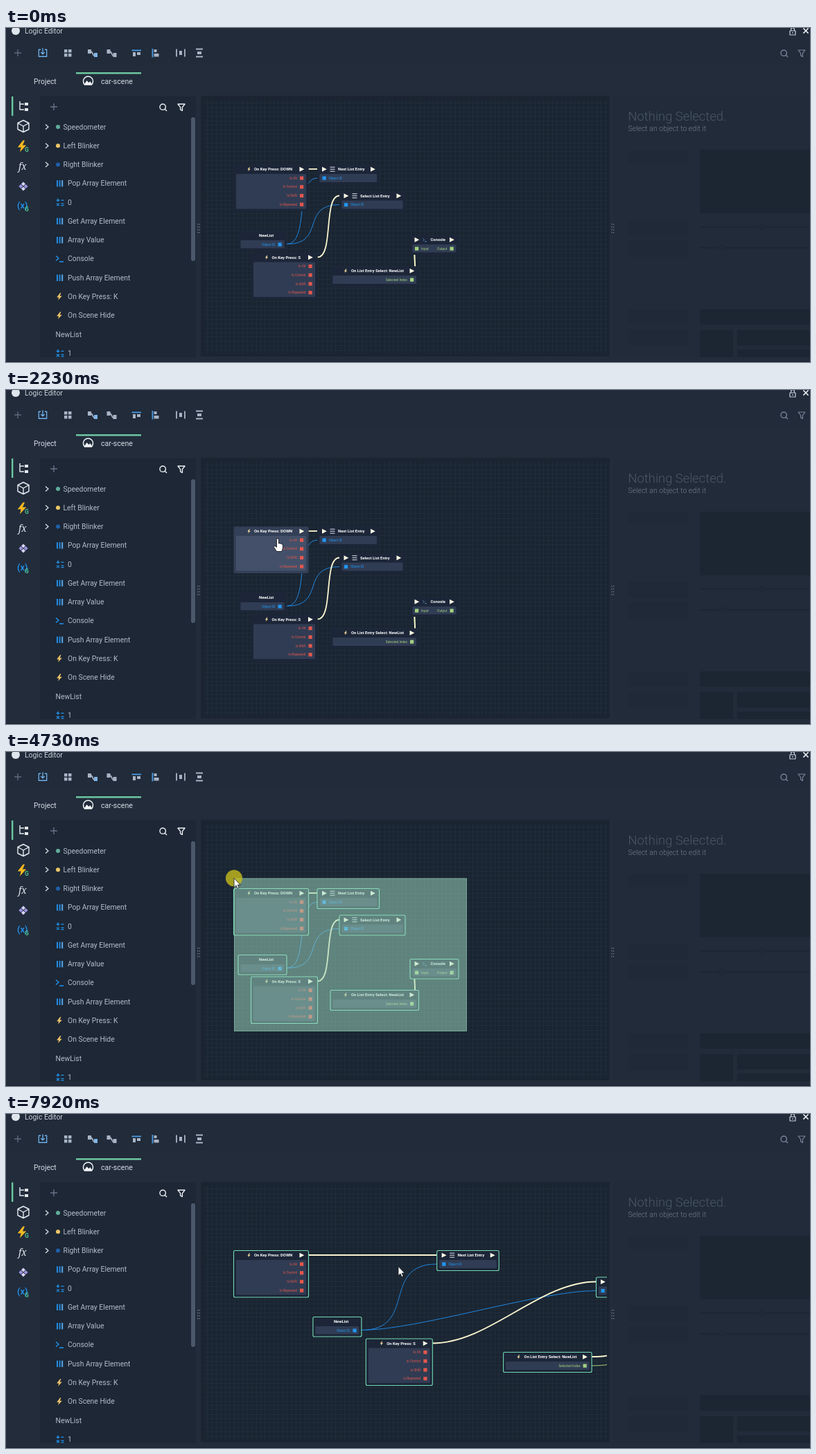
Write an HTML page with a canvas that moves like this. It is 1160 px wide and 483 px high and loops after 8000 ms.

```html
<!DOCTYPE html>
<html lang="en">
<head>
<meta charset="utf-8">
<title>Logic Editor</title>
<style>
  html, body { margin: 0; width: 100%; height: 100%; overflow: hidden; background: #222c3b; }
  #stage { position: relative; width: 1160px; height: 483px; overflow: hidden; }
  canvas { position: absolute; left: 0; top: 0; }
  .label { position: absolute; line-height: 16px; white-space: pre; font-family: Roboto, "Open Sans", sans-serif; }
</style>
</head>
<body>
<div id="stage"><canvas id="view" width="1160" height="483"></canvas></div>
<script>
const W = 1160, H = 483, LOOP = 8000, TICK = 77.55;
const stage = document.getElementById('stage');
const ctx = document.getElementById('view').getContext('2d');
const back = document.createElement('canvas');
back.width = W;
back.height = H;

const BLUE = '#2196f3', RED = '#e2574c', GREEN = '#a3d27f', CREAM = '#fbf6d0', MINT = '#74dcb4';
const BOLT = 'M1-5.5L-4 1h3.2L-2 5.5 4-1H.6L2.6-5.5z';
const FUNNEL = 'M-5-5H5L1.4-.4V4.6L-1.4 3V-.4z';

// ---------- drawing helpers ----------
function box(g, x, y, w, h, color, r = 0) {
  g.fillStyle = color;
  g.beginPath();
  g.roundRect(x, y, w, h, r);
  g.fill();
}

function dot(g, x, y, r, color) {
  g.fillStyle = color;
  g.beginPath();
  g.arc(x, y, r, 0, 7);
  g.fill();
}

function icon(g, x, y, d, { fill, line, w = 1.4, s = 1 }) {
  g.save();
  g.translate(x, y);
  g.scale(s, s);
  const p = new Path2D(d);
  if (fill) { g.fillStyle = fill; g.fill(p); }
  if (line) { g.strokeStyle = line; g.lineWidth = w; g.lineJoin = 'round'; g.stroke(p); }
  g.restore();
}

function label(text, x, y, size = 10.4, color = '#b3bdc9', css = '') {
  const el = document.createElement('div');
  el.className = 'label';
  el.textContent = text;
  el.style.cssText = `left:${x}px;top:${y - 8}px;font-size:${size}px;color:${color};${css}`;
  stage.append(el);
}

function write(text, x, y, size, color, weight = 400, align = 'left') {
  ctx.font = `${weight} ${size}px Roboto, sans-serif`;
  ctx.textAlign = align;
  ctx.fillStyle = color;
  ctx.fillText(text, x, y + size * 0.36);
}

// ---------- fixed interface ----------
function search(g, x, y, color) {
  icon(g, x, y, 'M3.4-.8A4.2 4.2 0 1 1-5-.8A4.2 4.2 0 1 1 3.4-.8M2.2 2.2L5 5', { line: color });
}

function drawToolbar(g) {
  const c = '#a9b5c6', dim = '#5d6a7c', tint = '#4a9be4';
  dot(g, 14, 4, 6, '#dfe5ec');
  icon(g, 1135, 5, 'M-4-1H4V5H-4zM-2.4-1V-3A2.4 2.4 0 0 1 2.4-3V-1M0 1V3', { line: '#c7cfd9', w: 1.2 });
  icon(g, 1154, 4, 'M-3.6-3.6L3.6 3.6M3.6-3.6L-3.6 3.6', { line: '#e8ecf1', w: 1.5 });
  icon(g, 17, 36, 'M-5 0H5M0-5V5', { line: dim });
  icon(g, 53, 36, 'M-3-5H-6V5.5H6V-5H3M0-7V2M-3-1L0 2 3-1', { line: '#6fb0ea', s: 0.95 });
  for (const [x, y] of [[84, 31], [90, 31], [84, 37], [90, 37]]) box(g, x, y, 4.5, 4.5, c);
  for (const x of [125, 152.5]) {
    box(g, x - 7, 31, 5, 6, c);
    box(g, x + 2, 36, 5, 6, x > 130 ? c : '#7fb4e6');
    icon(g, x, 36, 'M-3-2C0-3 0 5 3 4', { line: c, w: 1.8 });
  }
  box(g, 181.5, 31.5, 13.5, 1.8, tint);
  box(g, 183, 35, 4, 6, c);
  box(g, 189, 35, 5, 4, c);
  box(g, 210.5, 30, 1.8, 12.5, tint);
  box(g, 213.5, 31, 4, 4, c);
  box(g, 213.5, 37, 7, 4.5, c);
  icon(g, 252, 36, 'M-6-5.5V5.5M6-5.5V5.5', { line: c, w: 1.8 });
  box(g, 250, 33, 4, 6, c);
  icon(g, 279, 36, 'M-5-5.5H5M-5 5.5H5', { line: c, w: 1.8 });
  box(g, 276, 34, 6, 4, c);
  search(g, 1123, 37, '#76839a');
  icon(g, 1148, 37, FUNNEL, { line: '#76839a', w: 1.2 });
  box(g, 101, 64, 94, 2.4, '#6cc6a0');
  icon(g, 118.5, 77, 'M7 0A7 7 0 1 0-7 0 7 7 0 0 0-5 5H5A7 7 0 0 0 7 0z', { line: '#f1f4f7', w: 1.5 });
  icon(g, 118.5, 77, 'M-6 5L-2-1 1 2 3 0 6 5z', { fill: '#f1f4f7' });
  label('Logic Editor', 27, 5, 10.4, '#c9d1da');
  label('Project', 40, 77.5, 10.4, '#d6dce4');
  label('car-scene', 137, 77.5, 10.6, '#d6dce4');
}

function drawRail(g) {
  const c = '#e6ebf1';
  box(g, 8, 99, 2.4, 28, '#6cc6a0');
  icon(g, 25, 113, 'M-5-7V5H1M-5-3H1', { line: c });
  box(g, 27, 108, 5, 4, c);
  box(g, 27, 116, 5, 4, c);
  icon(g, 25, 142, 'M0-8.5L8-4.5V4.5L0 8.5-8 4.5V-4.5zM-8-4.5L0 0 8-4.5M0 0V8.5', { line: c });
  icon(g, 23, 171, BOLT, { fill: '#f5b921', s: 1.55 });
  for (const [dx, dy] of [[0, -3.6], [-3.6, 0], [3.6, 0], [0, 3.6]])
    icon(g, 25 + dx, 229 + dy, 'M0-3L3 0 0 3-3 0z', { fill: dy ? '#d6d4f4' : '#9c94e0' });
  label('G', 27, 175.5, 8.5, '#4fc08d', 'font-weight:700');
  label('fx', 18, 199.5, 13.5, c, 'font-style:italic;font-weight:500;font-family:"Noto Serif",serif');
  label('(x)', 16, 257, 13, BLUE, 'font-weight:500');
  label('G', 27, 262, 8.5, '#4fc08d', 'font-weight:700');
}

function drawTree(g) {
  box(g, 49, 99, 225, 377, '#1d2735');
  icon(g, 69, 114, 'M-5 0H5M0-5V5', { line: '#66738a' });
  search(g, 227, 115, '#eef1f5');
  icon(g, 253, 115, FUNNEL, { line: '#eef1f5' });
  box(g, 267, 129, 6, 208, '#4b586b', 3);
  const rows = ['>Speedometer', '>Left Blinker', '>Right Blinker', '|Pop Array Element', '=0', '|Get Array Element',
    '|Array Value', '_Console', '|Push Array Element', '!On Key Press: K', '!On Scene Hide', ' NewList', '=1'];
  const dots = ['#5fae9c', '#ecc765', '#1f5fa8'];
  rows.forEach((row, i) => {
    const y = 143 + i * 27.28, kind = row[0];
    if (kind === '>') {
      icon(g, 59, y, 'M-2-3.5L2 0-2 3.5', { line: '#d5dbe3' });
      dot(g, 75, y, 3, dots[i]);
    }
    if (kind === '|') for (let k = 0; k < 3; k++) box(g, 73 + k * 3.6, y - 4.7, 2, 9.4, k < 2 ? '#2389e0' : '#5aa7e8');
    if (kind === '_') icon(g, 77, y, 'M-5-4.5L-1-1-5 2.5M0 4H6', { line: BLUE });
    if (kind === '!') icon(g, 77, y, BOLT, { fill: '#f0c56a', s: 0.95 });
    if (kind === '=') icon(g, 78, y, 'M-5.5-3H-.5M-3-5.5V-.5M1.5-3H5.5M-5 1.5L-1 5M-1 1.5L-5 5M1.5 2H5.5M1.5 4.5H5.5', { line: BLUE, w: 1.3 });
    label(row.slice(1), kind === '>' ? 82.5 : kind === ' ' ? 71.5 : 89, y + 0.5);
  });
  box(g, 45, 476, 232, 7, '#222c3b');
}

function drawInspector(g) {
  const fade = '#1f2937', dark = '#1c2532';
  box(g, 876, 99, 284, 377, '#212b39');
  for (const [y, h] of [[177, 18], [277, 23], [307, 24], [407, 22], [437, 23]]) box(g, 898, y, 86, h, fade);
  for (const [x, y, w, h] of [[1001, 176, 159, 92], [1001, 407, 159, 22], [1001, 437, 48, 39], [1055, 437, 105, 22], [1055, 465, 105, 11]])
    box(g, x, y, w, h, dark);
  for (const [y, knob] of [[287, 1091], [317, 1032]]) {
    box(g, 1001, y, 159, 1.5, dark);
    dot(g, knob, y + 1, 5, '#1f2937');
  }
  label('Nothing Selected.', 897.5, 128, 18.4, '#4b5866', 'font-weight:300');
  label('Select an object to edit it', 897.5, 146, 10.5, '#727e8b', 'font-weight:300');
}

function drawBoard(g) {
  box(g, 281, 98, 590, 377, '#1b2532');
  box(g, 286, 104, 581, 367, '#1a2532');
  g.fillStyle = '#202c3a';
  for (let x = 290.4; x < 867; x += 6.38) g.fillRect(Math.round(x), 104, 1, 367);
  for (let y = 108.3; y < 471; y += 6.38) g.fillRect(286, Math.round(y), 581, 1);
  for (const x of [276, 873.5])
    for (let k = 0; k < 8; k++) box(g, x + (k & 1) * 2.5, 283 + (k >> 1) * 4, 1.2, 1.4, '#707d8e');
}

function drawBack() {
  const g = back.getContext('2d');
  box(g, 0, 0, W, H, '#222c3b');
  box(g, 0, 0, W, 53, '#212b39');
  drawToolbar(g);
  drawRail(g);
  drawTree(g);
  drawInspector(g);
  drawBoard(g);
  box(g, 0, 482, W, 1, '#19212c');
}

// ---------- node graph ----------
const keyRows = ['Is Alt', 'Is Control', 'Is Shift', 'Is Repeated'].map((text, i) => ({ text, i, out: true, color: RED }));
const idIn = [{ text: 'Object ID', i: 0, color: BLUE }];
const nodes = {
  down: { x: 328.5, y: 197.5, w: 108, h: 67.5, title: 'On Key Press: DOWN', tx: 29.5, mark: 'bolt', mx: 22, plays: [98], rows: keyRows },
  list: { x: 335, y: 293.5, w: 70, h: 28.5, title: 'NewList', tx: 30, plays: [], rows: [{ text: 'Object ID', i: 0, out: true, color: BLUE }] },
  key: { x: 353.5, y: 325, w: 96, h: 67.5, title: 'On Key Press: S', tx: 30, mark: 'bolt', mx: 22.5, plays: [85.5], rows: keyRows },
  next: { x: 449, y: 197.5, w: 89.5, h: 29, title: 'Next List Entry', tx: 30, mark: 'lines', mx: 22, plays: [10, 80], rows: idIn },
  pick: { x: 468, y: 344.5, w: 127.5, h: 29, title: 'On List Entry Select: NewList', tx: 30, mark: 'bolt', mx: 22, plays: [117.5], rows: [{ text: 'Selected Index', i: 0, out: true, color: GREEN }] },
  select: { x: 481, y: 236, w: 95, h: 29, title: 'Select List Entry', tx: 30, mark: 'lines', mx: 22, plays: [9.5, 85.5], rows: idIn },
  log: { x: 583, y: 299.5, w: 70, h: 28.5, title: 'Console', tx: 29.5, mark: 'prompt', mx: 21, plays: [9.5, 60], rows: [
    { text: 'Input', i: 0, color: GREEN }, { text: 'Output', i: 0, out: true, color: GREEN }] }
};
const all = Object.values(nodes);

// Equal gaps from the leftmost node onwards
let edge = all[0].x;
for (const n of all) {
  n.spread = edge;
  edge += n.w + 6.4;
}

const wires = [
  ['down', 'next', 6.5, 6.5, CREAM, 1.8], ['list', 'next', 19, 19.5, '#1f86e0', 1], ['list', 'select', 19, 19.5, '#1f86e0', 1],
  ['pick', 'log', 19.5, 19.5, GREEN, 1], ['key', 'select', 6.5, 6.5, CREAM, 1.8], ['pick', 'log', 6.5, 6.5, CREAM, 1.8]
];

function drawWire([from, to, dy0, dy1, color, width], left) {
  const a = nodes[from], b = nodes[to];
  const x0 = left(a) + a.w, y0 = a.y + dy0, x1 = left(b), y1 = b.y + dy1;
  ctx.strokeStyle = color;
  ctx.lineWidth = width;
  ctx.beginPath();
  if (x1 < x0) {
    ctx.moveTo(x0 - 5, y0);
    ctx.lineTo(x1 + 5.5, y1);
  } else {
    const d = Math.min(0.75 * (x1 - x0), 82);
    ctx.moveTo(x0, y0);
    ctx.bezierCurveTo(x0 + d, y0, x1 - d, y1, x1, y1);
  }
  ctx.stroke();
}

function drawNode(n, x, hover, chosen) {
  const { y, w, h } = n, ty = y + 6.7;
  box(ctx, x, y, w, h, hover ? '#333f56' : '#1c2638', 2);
  box(ctx, x + 3.5, y + 13.5, w - 7, h - 17, hover ? '#445069' : '#303c53', 1);
  if (n.mark === 'bolt') icon(ctx, x + n.mx, ty, BOLT, { fill: '#f3dc9a', s: 0.55 });
  if (n.mark === 'lines') icon(ctx, x + n.mx, ty, 'M-3.5-3H3.5M-3.5 0H3.5M-3.5 3H3.5', { line: '#dfe5ee', w: 1 });
  if (n.mark === 'prompt') icon(ctx, x + n.mx, ty, 'M-2.5-2L-.5 0-2.5 2M0 2.5H3', { line: '#5b9bd8', w: 0.8 });
  write(n.title, x + n.tx, ty, 5.85, '#fff', 700);
  for (const p of n.plays) icon(ctx, x + p, ty, 'M-3-3.5L3.8 0-3 3.5z', { fill: '#fffbe6' });
  for (const r of n.rows) {
    const px = r.out ? (n.plays.length ? n.plays[n.plays.length - 1] : 60) : n.plays[0];
    const ry = y + 19.5 + r.i * 12.7;
    box(ctx, x + px - 2.5, ry - 2.5, 5.2, 5.2, r.color);
    write(r.text, x + px + (r.out ? -6.5 : 6.5), ry, 4.8, r.color, 400, r.out ? 'right' : 'left');
  }
  if (chosen) {
    ctx.strokeStyle = MINT;
    ctx.lineWidth = 1.1;
    ctx.beginPath();
    ctx.roundRect(x, y, w, h, 2);
    ctx.stroke();
  }
}

// ---------- pointer ----------
const DRAG = 44, DROP = 60, PRESS = 85, RELEASE = 88;
const path = [
  [0, 868, 438], [1, 788, 406], [2, 711, 386], [6, 711, 386], [8, 688, 396], [10, 620, 285], [11, 598, 235], [13, 490, 172],
  [15, 370, 205], [17, 360, 280], [19, 397.5, 302], [21, 500, 357], [23, 608, 285], [24, 598, 235], [26, 480, 173],
  [27, 392, 215], [28, 456, 353], [29, 500, 338], [31, 581, 321], [33, 581, 321], [36, 600, 344], [39, 633, 379],
  [41, 665, 404], [44, 665, 404], [46, 612, 368], [48, 500, 300], [50, 408, 242], [54, 344, 206.5], [58, 329, 182.5],
  [67, 329, 182.5], [72, 300, 135], [77, 258, 64.5], [78, 257.5, 55.5], [82, 253.5, 38], [97, 253.5, 38], [100, 566, 220.5]
];

// Smooth curve through the points, at rest where the pointer holds still
function pointAt(n) {
  let i = 0;
  while (i < path.length - 2 && path[i + 1][0] <= n) i++;
  const a = path[i], b = path[i + 1], span = b[0] - a[0];
  const u = Math.min(1, (n - a[0]) / span);
  const slope = (k, c) => {
    const p = path[k - 1], q = path[k], r = path[k + 1];
    if (!p || !r || (q[c] - p[c]) * (r[c] - q[c]) <= 0) return 0;
    return (r[c] - p[c]) / (r[0] - p[0]);
  };
  return [1, 2].map(c => {
    const v = 1 - u;
    return a[c] * v * v * (1 + 2 * u) + b[c] * u * u * (1 + 2 * v)
      + span * u * v * (slope(i, c) * v - slope(i + 1, c) * u);
  });
}

function drawPointer(x, y, hand) {
  if (hand) {
    icon(ctx, x, y, 'M-1.6 1.2A1.5 1.5 0 0 1 1.4 1.2V7L3 6.6 5 7.4 7.4 8.4V13.5L6 18.5H-1.5L-5.4 12.6A1.4 1.4 0 0 1-3.2 11L-1.6 12.4z',
      { fill: '#fff', line: '#11161d', w: 0.9 });
  } else {
    icon(ctx, x, y, 'M0 0V13L3 10.4 5 15 7.2 14 5.2 9.6H9.2z', { fill: '#fff', line: '#11161d', w: 0.8 });
  }
}

// ---------- frame ----------
const inside = (x, y, l, t, w, h) => x >= l && x <= l + w && y >= t && y <= t + h;

function draw(t) {
  const n = Math.floor((t - 130) / TICK);
  const shown = n >= 0;
  const [px, py] = pointAt(Math.max(0, n));
  const dragging = n >= DRAG && n < DROP;
  const left = node => n >= RELEASE ? node.spread : node.x;
  const over = shown && !dragging ? all.find(k => inside(px, py, left(k), k.y, k.w, k.h)) : null;
  const [cx, cy] = path.find(k => k[0] === DRAG).slice(1);
  const chosen = k => n >= DROP ||
    dragging && k.x < cx && k.x + k.w > px && k.y < cy && k.y + k.h > py;

  ctx.drawImage(back, 0, 0);
  ctx.save();
  ctx.beginPath();
  ctx.rect(286, 104, 581, 367);
  ctx.clip();
  for (const w of wires) drawWire(w, left);
  for (const k of all) drawNode(k, left(k), k === over, chosen(k));
  if (dragging && px < cx - 1) {
    box(ctx, px, py, cx - px, cy - py, 'rgba(160,216,192,.52)');
    ctx.strokeStyle = 'rgba(150,210,185,.45)';
    ctx.lineWidth = 1;
    ctx.strokeRect(px + 0.5, py + 0.5, cx - px - 1, cy - py - 1);
  }
  ctx.restore();

  if (shown && inside(px, py, 239, 23, 27, 27)) box(ctx, 239, 23, 27, 27, 'rgba(160,185,220,.1)', 3);
  if (dragging || n >= PRESS && n < RELEASE) dot(ctx, px, py, 12, 'rgba(197,189,28,.8)');
  if (shown) drawPointer(px, py, over);
}

drawBack();
const start = performance.now();
function loop() {
  draw((performance.now() - start) % LOOP);
  requestAnimationFrame(loop);
}
loop();
</script>
</body>
</html>
```
